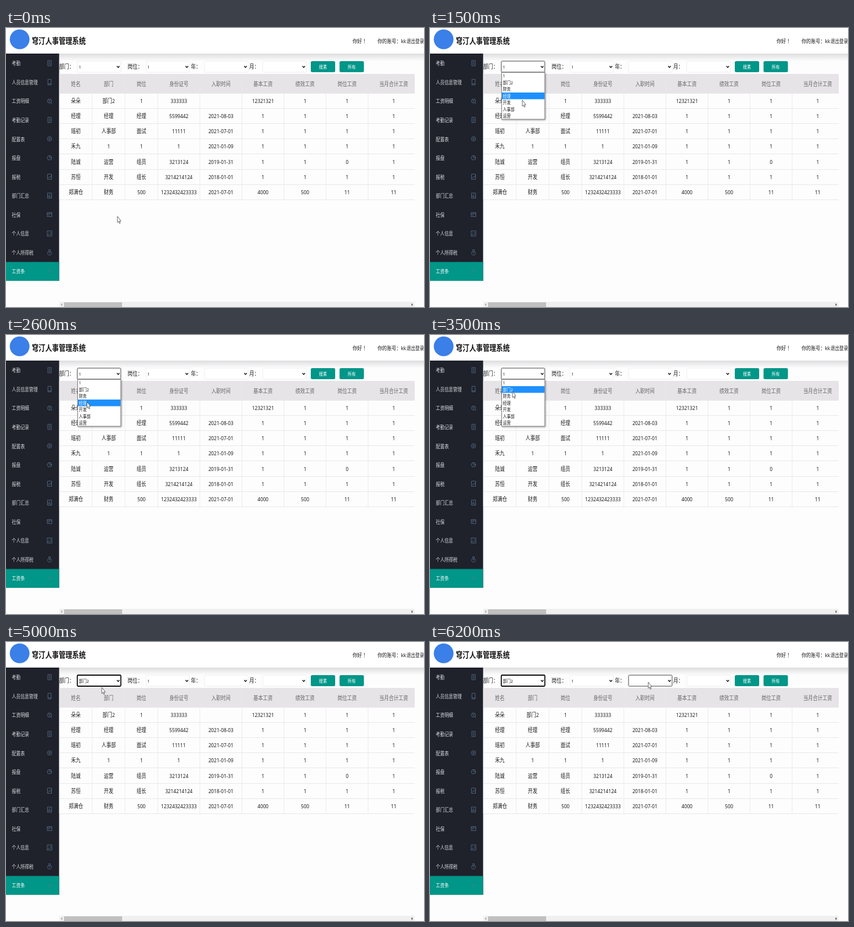
Animation, 720 px wide and 480 px high, one loop 8000 ms. Source, as an HTML page:

```html
<!DOCTYPE html>
<html lang="zh-CN">
<head>
<meta charset="utf-8">
<title>人事管理</title>
<style>
html, body { margin: 0; width: 100%; height: 100%; overflow: hidden; background: #fefdfe; }
svg { display: block; width: 720px; height: 480px; }
text { font-family: "Noto Sans", "Noto Sans CJK SC", "Noto Sans CJK", sans-serif; white-space: pre; }
.label { font-family: "Noto Sans", "Noto Sans CJK TC", sans-serif; }
.icon { fill: none; stroke: #587890; stroke-width: .8; }
</style>
</head>
<body>
<svg id="stage" viewBox="0 0 720 480" xmlns="http://www.w3.org/2000/svg"></svg>
<script>
const LOOP = 8000, TICK = 100;
const SQUEEZE = 27 / 32; // widescreen page shown at 3:2
const TEAL = '#009688', INK = '#1c1c1c';
const MID = 'text-anchor="middle"';

const text = (x, y, str, size = 9.9, fill = INK, extra = '') =>
  `<text transform="translate(${x} ${y + size * .37}) scale(${SQUEEZE} 1)" font-size="${size}" fill="${fill}" ${extra}>${str}</text>`;
const rect = (x, y, w, h, fill, extra = '') =>
  `<rect x="${x}" y="${y}" width="${w}" height="${h}" fill="${fill}" ${extra}/>`;
const path = (d, extra) => `<path d="${d}" ${extra}/>`;

function header() {
  return rect(91, 44, 629, 13, 'url(#shade)') + rect(0, 0, 720, 44, '#fff') +
    '<circle cx="23.5" cy="19.5" r="17" fill="#3b7fe8"/>' +
    text(44.5, 22, '穹汀人事管理系统', 13.75, '#111', 'font-weight="700"') +
    text(597, 22.5, '你好 ！', 9.6, INK, 'class="label"') +
    text(640, 22.5, '你的账号：kk', 9.6, INK, 'class="label"') +
    text(690, 22.5, '退出登录', 8.9);
}

// small line icons, centred on 0,0
const box = (w, h) => `M${-w} ${-h}H${w}V${h}H${-w}Z`;
const ring = r => `M${-r} 0a${r} ${r} 0 1 0 ${2 * r} 0a${r} ${r} 0 1 0 ${-2 * r} 0`;
const lines = w => [-2, 0, 2].map(y => `M${-w} ${y}H${w}`).join('');
const yen = 'M-1.5-2L0 0 1.5-2M0 0V2';
const doc = box(3, 4.5) + lines(1.2);
const menu = [
  ['考勤', doc],
  ['人员信息管理', box(2.8, 4.8) + 'M-2.8 3H2.8'],
  ['工资明细', ring(3.6) + yen + 'M2.5 2.8L4 4.8'],
  ['考勤记录', doc],
  ['配置表', ring(3.8) + ring(1.4)],
  ['报盘', ring(3.8) + 'M0-4V0H3.8'],
  ['报税', box(3.5, 4.5) + 'M-2 2.5L0 0 1 1 3.5-2.5'],
  ['部门汇总', box(3.5, 4.5) + 'M-1.8 3V0M0 3V-2.5M1.8 3V1'],
  ['社保', box(4, 3.5) + 'M-4-1.3H4M-2.5 1H0'],
  ['个人信息', box(4, 4.5) + 'M-3 3Q-1.5-1 0 3M-2-2H-1M1-1.5H3M1 1H3'],
  ['个人所得税', 'M-1.5-4.5H1.5L1-2.5C5 1 4 4.5 0 4.5S-5 1-1-2.5Z' + yen],
  ['工资条', lines(2)],
];

function sidebar() {
  const last = menu.length - 1;
  return rect(0, 44, 91.5, 391, '#1f212b') + rect(0, 402.5, 91.5, 32.5, TEAL) +
    menu.map(([name, d], i) => {
      const y = 61 + i * 32.56;
      return text(10, y, name, 8.85, i === last ? '#fff' : '#dcdee2') +
        path(d, `class="icon" transform="translate(75 ${y - .5})"`);
    }).join('');
}

const rows = [
  '姓名 部门 岗位 身份证号 入职时间 基本工资 绩效工资 岗位工资 当月合计工资',
  '朵朵 部门2 1 333333 - 12321321 1 1 1',
  '经理 经理 经理 5599442 2021-08-03 1 1 1 1',
  '瑶初 人事部 面试 11111 2021-07-01 1 1 1 1',
  '禾九 1 1 1 2021-01-09 1 1 1 1',
  '陆诚 运营 组员 3213124 2019-01-31 1 1 0 1',
  '苏恒 开发 组长 3214214124 2018-01-01 1 1 1 1',
  '郑满仓 财务 500 1232432423333 2021-07-01 4000 500 11 11',
].map(r => r.split(' '));

// three narrow columns, five medium ones, a wide one cut off at the right
const edge = c => 92 + Math.min(c, 3) * 56.5 + Math.max(0, Math.min(c, 8) - 3) * 72.45 + (c > 8 ? 88 : 0);

function table() {
  const top = 112, step = 26.1;
  let out = rect(92, 79, 612, 33, '#e6e4e6');
  rows.forEach((row, r) => {
    const y = r ? top + (r - .5) * step + .5 : 96;
    row.forEach((cell, c) => {
      if (cell !== '-') out += text((edge(c) + edge(c + 1)) / 2, y, cell, 9.8, r ? INK : '#666', MID);
      if (!r) out += path(`M${edge(c)} 79V295`, 'stroke="#e9e8e9" stroke-width=".8"');
    });
    out += path(`M92 ${Math.round(top + r * step) + .5}H704`, 'stroke="#e9e8e9"');
  });
  return out;
}

const selects = [[122.8, '部门：', 91.5], [241, '岗位：', 209.5], [342, '年：', 318.5], [442.3, '月：', 419]];
const SEL = { y: 57, w: 75, h: 19 };

function filters() {
  const button = (x, label) => rect(x, 57, 42, 19, TEAL, 'rx="2.5"') +
    text(x + 21, 66.8, label, 8.3, '#fff', MID + ' font-weight="500"');
  return selects.map(([x, label, lx], i) =>
    text(lx, 66.5, label, 10.2, INK, 'class="label"') +
    rect(x, SEL.y, SEL.w, SEL.h, '#fff', `id="sel${i}" rx="1.5"`) +
    (i < 2 ? text(x + 2.6, 67, '1', 8, INK, `id="val${i}"`) : '') +
    path(`M${x + 68.3} 65.6l2.2 2.3 2.2-2.3`, 'fill="none" stroke="#111" stroke-width="1.4"')
  ).join('') + button(525, '搜素') + button(574.5, '所有');
}

const options = ['1', '部门2', '财务', '经理', '开发', '人事部', '运营'];
const LIST = { x: 123.5, y: 76.5, w: 74.3, h: 80.5, row: 11.5 };

function popup() {
  const { x, y, w, h, row } = LIST;
  return '<g id="popup">' +
    rect(x, y, w, h, '#fff', 'stroke="#777" stroke-width=".9" style="filter:drop-shadow(1px 1px 1.5px #0006)"') +
    rect(x + .5, y, w - 1, row, '#1e90ff', 'id="bar"') +
    options.map((o, i) => text(x + 1.9, y + (i + .5) * row, o, 8, INK, 'class="opt"')).join('') + '</g>';
}

function scrollbar() {
  return rect(92, 471, 612, 9, '#f1f0f1') + rect(100, 472, 100, 8, '#c1c0c1') +
    path('M97 473.5v5l-2.5-2.5Z', 'fill="#a5a5a5"') + path('M698.5 473.5v5l2.5-2.5Z', 'fill="#505050"');
}

const $ = id => document.getElementById(id);
$('stage').innerHTML =
  '<defs><linearGradient id="shade" x2="0" y2="1"><stop stop-color="#dedddf"/><stop offset="1" stop-color="#fefdfe"/></linearGradient></defs>' +
  rect(0, 0, 720, 480, '#fefdfe') + header() + sidebar() + table() + filters() + scrollbar() + popup() +
  path('M0 0V10.6L2 8.6 3.4 12.2 4.9 11.5 3.5 8H6.1Z', 'id="cursor" fill="#fff" stroke="#444" stroke-width=".8" stroke-linejoin="round"');
const optEls = [...document.querySelectorAll('.opt')];

// pointer legs: leave at, arrive at, x, y; it rests in between
const legs = [
  [0, 0, 192, 324], [0, 700, 153, 80], [700, 900, 157, 72], [1400, 1500, 159, 124],
  [1500, 1700, 150, 166], [1800, 1900, 137, 130], [1900, 2300, 130, 166], [2300, 2400, 138, 113],
  [2500, 2700, 141, 117], [3200, 3500, 142, 97], [4100, 4400, 100, 94], [4900, 5000, 165, 78],
  [5000, 5300, 593, 68], [5600, 6000, 264, 69], [6000, 6200, 376, 69],
];
const OPEN = 1100, CHOOSE = 4100, LAG = 20;

function pointer(t) {
  let x, y;
  for (const [from, to, tx, ty] of legs) {
    if (x === undefined || t >= to) [x, y] = [tx, ty];
    else if (t > from) {
      const p = (t - from) / (to - from);
      return [x + (tx - x) * p, y + (ty - y) * p];
    } else break;
  }
  return [x, y];
}

// the highlight trails the pointer slightly
function optionAt(t) {
  const i = Math.floor((pointer(t - LAG)[1] - LIST.y) / LIST.row);
  return Math.max(0, Math.min(options.length - 1, i));
}

function draw(ms) {
  const t = Math.floor(ms / TICK) * TICK;
  const [x, y] = pointer(t);
  const open = t >= OPEN && t < CHOOSE, chosen = t >= CHOOSE;
  const pick = optionAt(t);
  $('cursor').setAttribute('transform', `translate(${x} ${y})`);

  $('popup').style.display = open ? '' : 'none';
  $('bar').setAttribute('y', LIST.y + pick * LIST.row);
  optEls.forEach((el, i) => el.setAttribute('fill', i === pick ? '#fff' : INK));

  selects.forEach(([sx], i) => {
    const hover = x >= sx && x <= sx + SEL.w && y >= SEL.y && y <= SEL.y + SEL.h;
    const bold = i === 0 && chosen;
    const dark = hover || (i === 0 && open);
    $('sel' + i).setAttribute('stroke', bold ? '#101010' : dark ? '#444' : '#eee');
    $('sel' + i).setAttribute('stroke-width', bold ? 1.8 : 1);
  });
  $('val0').textContent = options[chosen ? 1 : 0];
}

const start = performance.now();
function loop() {
  draw((performance.now() - start) % LOOP);
  requestAnimationFrame(loop);
}
loop();
</script>
</body>
</html>
```
